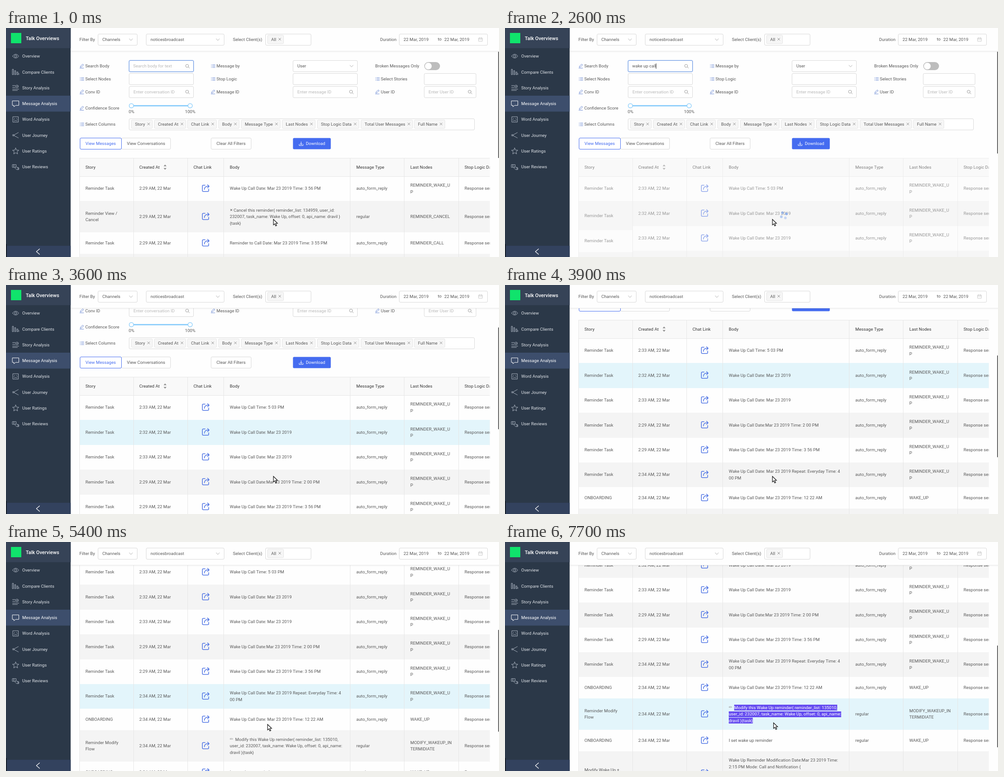
Recreate the animation shown at these times as an HTML page with a canvas. Size 1095 by 511 pixels, loop 8 s.

```html
<!DOCTYPE html>
<html lang="en">
<head>
<meta charset="utf-8">
<title>Message analysis</title>
<style>
html, body { margin: 0; width: 100%; height: 100%; overflow: hidden; background: #fefefe; }
canvas { display: block; width: 1095px; height: 511px; }
</style>
</head>
<body>
<canvas id="stage"></canvas>
<script>
const W = 1095, H = 511, LOOP = 8000;
const canvas = document.getElementById('stage');
const dpr = window.devicePixelRatio || 1;
canvas.width = W * dpr;
canvas.height = H * dpr;
const ctx = canvas.getContext('2d');

const FONT = 'Roboto, "Open Sans", sans-serif';
const SIZE = 9.66, LEAD = 14.4;
const INK = '#595959', DARK = '#383838', HINT = '#b8b8b8';
const LINE = '#d9d9d9', GRID = '#e6e6e6', BLUE = '#456cf0', PAPER = '#fefefe';

// ---- helpers ----
const clamp = (v, a = 0, b = 1) => Math.min(b, Math.max(a, v));
const ramp = (t, a, b) => clamp((t - a) / (b - a));

// Piecewise linear track of [time, value, value...] keys.
function track(keys, t, i = 1) {
  let prev = keys[0];
  for (const key of keys) {
    if (t < key[0]) {
      const u = ramp(t, prev[0], key[0]);
      return prev[i] + (key[i] - prev[i]) * u;
    }
    prev = key;
  }
  return prev[i];
}

function setFont(size = SIZE, weight = 400) { ctx.font = `${weight} ${size}px ${FONT}`; }

// Text centred on y, with the baseline on a whole pixel.
function text(str, x, y, color = INK, size = SIZE, weight = 400) {
  setFont(size, weight);
  ctx.fillStyle = color;
  ctx.fillText(str, x, Math.round(y + size * 0.355));
}

function widthOf(str) { setFont(); return ctx.measureText(str).width; }

function rect(x, y, w, h, color) { ctx.fillStyle = color; ctx.fillRect(x, y, w, h); }

function box(x, y, w, h, fill, stroke, r = 2.5) {
  ctx.beginPath();
  ctx.roundRect(x, y, w, h, r);
  if (fill) { ctx.fillStyle = fill; ctx.fill(); }
  if (stroke) { ctx.strokeStyle = stroke; ctx.lineWidth = 1; ctx.stroke(); }
}

function stroke(d, x, y, color, width = 1) {
  ctx.save();
  ctx.translate(x, y);
  ctx.strokeStyle = color;
  ctx.lineWidth = width;
  ctx.lineJoin = ctx.lineCap = 'round';
  ctx.stroke(new Path2D(d));
  ctx.restore();
}

function circle(x, y, r, fill, edge, width = 1) {
  ctx.beginPath();
  ctx.arc(x, y, r, 0, Math.PI * 2);
  if (fill) { ctx.fillStyle = fill; ctx.fill(); }
  if (edge) { ctx.strokeStyle = edge; ctx.lineWidth = width; ctx.stroke(); }
}

const chevron = (x, y) => stroke('M-3.5-2L0 2L3.5-2', x, y, '#b0b0b0');
const cross = (x, y) => stroke('M-2.4-2.4L2.4 2.4M2.4-2.4L-2.4 2.4', x, y, '#8c8c8c');
const lens = (x, y) => stroke('M2 2L4.5 4.5M2.6-.5A3.3 3.3 0 1 1-4-.5A3.3 3.3 0 1 1 2.6-.5', x, y, '#9a9a9a');

function tag(label, x, y) {
  const w = widthOf(label) + 24.5;
  box(x + .5, y - 9.5, w, 19, '#f6f6f6', '#e4e4e4', 2);
  text(label, x + 8.5, y);
  cross(x + w - 8, y - .5);
}

// ---- sidebar ----
const MENU = [
  ['Overview', 'M-7 0Q0-9 7 0Q0 9-7 0M2.5 0A2.5 2.5 0 1 1-2.5 0A2.5 2.5 0 1 1 2.5 0'],
  ['Compare Clients', 'M-7-6H-5V6H-7ZM-2-3H0V6H-2ZM3 0H5V6H3ZM7 3V6'],
  ['Story Analysis', 'M-7-5H-1M-7-1H-1M-7 3H7M-7 6H4M6-3A3 3 0 1 1 0-3A3 3 0 1 1 6-3M1.8-3L3-2L4.7-4.2'],
  ['Message Analysis', 'M-7-6H7V4H0L-4 7V4H-7Z'],
  ['Word Analysis', 'M-6-6H6V6H-6ZM-3 4Q0 0 3 4M-3-2H-2M2-2H3M-4 1H-3M3 1H4'],
  ['User Journey', 'M6-6L-5 0L6 6M-3.5 0A1.7 1.7 0 1 1-7 0A1.7 1.7 0 1 1-3.5 0'],
  ['User Ratings', 'M0-7L2-2.2L7-1.8L3.2 1.5L4.4 6.5L0 3.8L-4.4 6.5L-3.2 1.5L-7-1.8L-2-2.2Z'],
  ['User Reviews', 'M-7-5H-4V1H-7ZM-4 0L-1 3V0H1V-5H-4M2 1H5V6H2L0 4M5 2H7V6H5']
];

function drawSidebar() {
  const w = 143.6;
  rect(0, 0, w, H, '#2b3848');
  rect(0, 0, w, 45, '#364357');
  rect(0, 151, w, 35.5, '#3d4e6c');
  rect(0, 486, w, 25, '#33425e');
  rect(0, 482, 2, 29, '#1a222d');
  box(11, 11, 23, 23, '#10e36c', null, 0);
  text('Talk Overviews', 44, 23, '#fff', 11.04, 500);
  MENU.forEach(([label, icon], i) => {
    const y = 62.8 + 35.3 * i, on = i === 3;
    stroke(icon, 21.5, y, on ? '#fff' : '#a9b2bf');
    text(label, 36, y, on ? '#fff' : '#dfe3e8');
  });
  stroke('M3.5-6L-3.5 0L3.5 6', 71, 499, '#fff', 1.2);
}

// ---- top bar ----
function drawTopBar() {
  rect(143, 0, W - 143, 52, PAPER);
  const g = ctx.createLinearGradient(0, 51, 0, 55);
  g.addColorStop(0, 'rgba(0,0,0,.07)');
  g.addColorStop(1, 'rgba(0,0,0,0)');
  rect(143, 51, W - 143, 4, g);
  text('Filter By', 163, 25.5);
  box(204.5, 13.5, 87, 25, '#fff', LINE);
  text('Channels', 214, 25.5);
  chevron(277.5, 26);
  box(311.5, 13.5, 173, 25, '#fff', LINE);
  text('noticesbroadcast', 321, 25.5);
  chevron(470.5, 26);
  text('Select Client(s)', 504, 25.5);
  box(576.5, 13.5, 101, 25, '#fff', LINE);
  tag('All', 580.5, 25.5);
  text('Duration', 831, 25.5);
  box(873.5, 13.5, 196, 25, '#fff', LINE);
  text('22 Mar, 2019', 883, 25.5);
  text('to', 959, 24.5);
  text('22 Mar, 2019', 973.5, 25.5);
  stroke('M-4-3H4V4H-4ZM-4-.5H4M-2-4.5V-2M2-4.5V-2', 1054, 25.5, '#c4c4c4', .9);
}

// ---- filters ----
const EDIT = 'M-4.5 4.5H4M-3.5 2.2L-3 0L2-4.5L4-2.6L-1 1.8Z';
const LIST = 'M-1.5-3H4.5M-1.5 0H4.5M-1.5 3H4.5M-4-3H-3.4M-4 0H-3.4M-4 3H-3.4';
const FIELDS = [
  ['Search Body', EDIT, 0, 0, ''], ['Message by', LIST, 1, 0, ''],
  ['Select Nodes', LIST, 0, 1, ''], ['Stop Logic', LIST, 1, 1, ''], ['Select Stories', LIST, 2, 1, ''],
  ['Conv ID', EDIT, 0, 2, 'Enter conversation ID'], ['Message ID', EDIT, 1, 2, 'Enter message ID'],
  ['User ID', EDIT, 2, 2, 'Enter User ID']
];
const COLS = [[168.5, 273.5, 143], [460, 637.5, 143], [825, 929, 115]];
const TAGS = [['Story', 278], ['Created At', 329], ['Chat Link', 402.5], ['Body', 471.5],
  ['Message Type', 522], ['Last Nodes', 613], ['Stop Logic Data', 691],
  ['Total User Messages', 788], ['Full Name', 906.5]];
const TYPED = 'wake up call';
const KEYS = [[700, 1], [900, 2], [1000, 3], [1200, 5], [1400, 6], [1700, 7], [1900, 10], [2100, 11], [2200, 12]];

function label(name, icon, x, y) {
  stroke(icon, x, y, '#5f7fd0', .9);
  text(name, x + 7.5, y);
}

function drawFilters(t) {
  for (const [name, icon, col, row, hint] of FIELDS) {
    const [lx, bx, bw] = COLS[col], y = 85 + 28.8 * row, focus = !col && !row;
    label(name, icon, lx, y);
    const top = Math.round(y) - 12.5;
    if (focus) box(bx - 1.5, top - 1.5, bw + 3, 28, '#dce8fa', null, 4);
    box(bx, top, bw, 25, '#fff', focus ? '#5f8fe0' : LINE);
    if (hint) text(hint, bx + 9.5, y, HINT);
    if (focus || hint) lens(bx + bw - 13.5, y);
  }
  text('User', 647, 85);
  chevron(767.5, 85);

  const count = KEYS.reduce((n, [at, len]) => t >= at ? len : n, 0);
  const word = TYPED.slice(0, count);
  text(word || 'Search body for text', 282.5, 85, word ? INK : HINT);
  const caret = (t >= 400 && t < 2750) || t >= 3300;
  if (caret) rect(Math.round(282.3 + widthOf(word)), 79, 1, 12, '#333');

  text('Broken Messages Only', 820, 85);
  box(929, 76, 35, 18, '#bdbdbd', null, 9);
  circle(938, 85, 7.6, '#fff');

  label('Confidence Score', EDIT, 168.5, 179);
  rect(278, 172, 131, 3, '#91d0fb');
  for (const x of [278.5, 409]) circle(x, 173.5, 4.8, '#fff', '#91d0fb', 1.5);
  text('0%', 272.5, 187);
  text('100%', 397.5, 187);

  label('Select Columns', LIST, 168.5, 215);
  box(273.5, 202.5, 767, 25, '#fff', LINE);
  for (const [name, x] of TAGS) tag(name, x, 214.7);

  box(256.5, 245.5, 109, 25, '#fff', LINE);
  box(164.5, 245.5, 92, 25, '#fff', BLUE);
  text('View Messages', 176.5, 258, BLUE);
  text('View Conversations', 268.5, 258);
  box(455.5, 245.5, 89, 25, '#fff', LINE);
  text('Clear All Filters', 467.5, 258);
  box(637.4, 245.4, 84, 25.2, BLUE, null);
  stroke('M0-4V2M-2.3 0L0 2.3L2.3 0M-4.3 1.5V4.3H4.3V1.5', 655.5, 258, '#fff');
  text('Download', 666, 258, '#fff');
}

// ---- table ----
const TOP = 331, ROW = 55.4;
const EDGES = [163, 283, 403, 483, 764, 884, 1005];
const TEXT_X = [176.5, 296, 416.5, 497, 778, 898, 1018.5];
const HEADS = ['Story', 'Created At', 'Chat Link', 'Body', 'Message Type', 'Last Nodes', 'Stop Logic Data'];
const FORM = 'auto_form_reply', NODE = 'REMINDER_WAKE_U|P', TASK = 'Reminder Task', DAY = ' AM, 22 Mar';
const row = (story, time, body, type, node, h = ROW, mark = '', indent = 0) =>
  ({ story, time: time + DAY, body, type, node, h, mark, indent });
const wake = (time, rest) => row(TASK, time, 'Wake Up Call ' + rest, FORM, NODE);

const BEFORE = [
  wake('2:29', 'Date: Mar 23 2019 Time: 3 56 PM'),
  row('Reminder View /|Cancel', '2:29',
    'Cancel this reminder{ reminder_list: 134959, user_id:|232007, task_name: Wake Up, offset: 0, api_name: dravil }|{task}',
    'regular', 'REMINDER_CANCEL', 70, '✕', 8.5),
  row(TASK, '2:29', 'Reminder to Call Date: Mar 23 2019 Time: 3 55 PM', FORM, 'REMINDER_CALL', 48),
  row('', '', '', '', '', 70)
];
const AFTER = [
  wake('2:33', 'Time: 5 03 PM'),
  wake('2:32', 'Date: Mar 23 2019'),
  wake('2:33', 'Date: Mar 23 2019'),
  wake('2:29', 'Date:Mar 23 2019 Time: 2 00 PM'),
  wake('2:29', 'Date: Mar 23 2019 Time: 3 56 PM'),
  wake('2:34', 'Date: Mar 23 2019 Repeat: Everyday Time: 4|00 PM'),
  row('ONBOARDING', '2:34', 'Wake Up Call Date: Mar 23 2019 Time: 12 22 AM', FORM, 'WAKE_UP', 48),
  row('Reminder Modify|Flow', '2:34',
    'Modify this Wake Up reminder{ reminder_list: 135010,|user_id: 232007, task_name: Wake Up, offset: 0, api_name:|dravil }{task}',
    'regular', 'MODIFY_WAKEUP_IN|TERMIDIATE', 70, '✏', 12),
  row('ONBOARDING', '2:34', 'I set wake up reminder', 'regular', 'WAKE_UP', 48),
  row('Modify Wake Up +|Reminder', '2:34',
    'Wake Up Reminder Modification Date:Mar 23 2019 Time:|2:15 PM Mode: Call and Notification {|reminder_list: 135010, user_id: 232007,|task_name: Wake Up, offset: 0, api_name:|dravil }{task}',
    'regular', 'MODIFY_WAKEUP', 98)
];
const STALE = [ROW, 65, 48.5, 70];   // heights of the pinned column before it catches up
const HOVERS = [[2950, 1], [4350, 6], [4600, 5], [5500, 7]];
const FADE = 200;

function hoverLevel(t, index) {
  let level = 0;
  HOVERS.forEach(([at, i], n) => {
    if (i !== index || t < at) return;
    const end = HOVERS[n + 1] ? HOVERS[n + 1][0] : Infinity;
    level = t < end ? ramp(t, at, at + FADE) : 1 - ramp(t, end, end + FADE);
  });
  return level;
}

function lines(str, x, mid, color = INK, mark = '', indent = 0) {
  const parts = str.split('|'), first = mid - (parts.length - 1) * LEAD / 2;
  if (mark) {
    const pencil = mark === '✏';
    ctx.font = `${pencil ? 9.5 : 8}px "DejaVu Sans", sans-serif`;
    ctx.fillStyle = pencil ? '#999' : '#444';
    ctx.fillText(mark, x, Math.round(first + 3));
  }
  parts.forEach((p, i) => text(p, x + (i ? 0 : indent), first + i * LEAD, color));
}

const linkIcon = (x, y) =>
  stroke('M-1.5-6.5H-5.5Q-7.5-6.5-7.5-4.5V5.5Q-7.5 7.5-5.5 7.5H4.5Q6.5 7.5 6.5 5.5V2M-3 3Q-2.5-4 4-4H7.5M4-7.5L7.5-4L4-.5', x, y, '#4c72e4', 1.5);

function cellBack(x, w, y, h, index, t) {
  rect(x, y, w, h, index % 2 ? '#f4f4f4' : PAPER);
  ctx.globalAlpha = hoverLevel(t, index);
  rect(x, y, w, h, '#e3f5fb');
  ctx.globalAlpha = 1;
  rect(x, y + h, w, 1, GRID);
}

function drawRows(t) {
  const rows = t < 2550 ? BEFORE : AFTER, stale = t >= 2550 && t < 2800;
  let y = TOP, pinned = TOP;
  rows.forEach((r, i) => {
    const top = Math.round(y), h = Math.round(y + r.h) - top, mid = y + r.h / 2 - .7;
    const ph = stale && STALE[i] ? STALE[i] : r.h;
    const pTop = Math.round(pinned);
    cellBack(283, 792, top, h, i, t);
    if (!stale || i < STALE.length) {
      cellBack(163, 120, pTop, Math.round(pinned + ph) - pTop, i, t);
      lines(r.story, TEXT_X[0], pinned + ph / 2 - .7);
    }
    if (r.type) {
      text(r.time, TEXT_X[1], mid);
      linkIcon(443.7, mid - .7);
      lines(r.body, TEXT_X[3], mid, INK, r.mark, r.indent);
      if (r.mark === '✏') drawSelection(r, mid, t);
      text(r.type, TEXT_X[4], mid);
      lines(r.node, TEXT_X[5], mid);
      text('Response sent', TEXT_X[6], mid);
    }
    y += r.h;
    pinned += ph;
  });
  return y;
}

function drawSelection(r, mid, t) {
  if (t < 6850) return;
  const [px, py] = pointer(t), parts = r.body.split('|');
  const first = mid - LEAD, shift = scrollAt(t);
  const current = clamp(Math.floor((py + shift - first + LEAD / 2) / LEAD), 0, 2);
  parts.forEach((p, i) => {
    if (i > current) return;
    const x = TEXT_X[3] + (i ? 0 : r.indent), y = first + i * LEAD;
    const full = widthOf(p), w = i < current ? full : clamp(px - x, 0, full);
    ctx.save();
    ctx.beginPath();
    ctx.rect(x, Math.round(y - 6), w, 13);
    ctx.clip();
    rect(x, y - 8, w, 16, '#654cf0');
    text(p, x, y, '#fff');
    ctx.restore();
  });
}

function drawTable(t) {
  ctx.save();
  ctx.beginPath();
  ctx.rect(163, 290, 911.5, 900);
  ctx.clip();
  const bottom = drawRows(t);
  rect(163, 290, 912, 41, '#f9f9f9');
  rect(163, 290, 912, 1, GRID);
  rect(163, 331, 912, 1, GRID);
  HEADS.forEach((h, i) => text(h, TEXT_X[i], 310.3, DARK));
  ctx.fillStyle = '#8c8c8c';
  ctx.fill(new Path2D('M350 308.5L353.3 304.8L356.6 308.5ZM350 312.5L353.3 316.2L356.6 312.5Z'));
  for (const x of EDGES) rect(x, 290, 1, bottom - 290, GRID);

  const dim = ramp(t, 2350, 2550) - ramp(t, 2800, 3100);
  if (dim > 0) rect(163, 290, 912, 300, `rgba(247,247,247,${dim * .4})`);
  ctx.restore();
  if (t >= 2400 && t < 2800) drawSpinner(t);
}

function drawSpinner(t) {
  for (let i = 0; i < 4; i++) {
    const a = t / 1200 * Math.PI * 2 + i * Math.PI / 2;
    ctx.globalAlpha = .35 + .12 * i;
    circle(619.5 + 6.6 * Math.cos(a), 418 + 6.6 * Math.sin(a), 2.9, '#6f9bea');
  }
  ctx.globalAlpha = 1;
}

// ---- motion ----
const SCROLL = [[3430, 0], [3500, 35], [3600, 85], [3700, 134], [3800, 178], [3900, 212], [4050, 233], [4300, 240],
  [5130, 240], [5250, 264], [5400, 291], [5600, 301], [5730, 301], [5850, 330], [5980, 354], [6100, 362]];
const POINTER = [[4350, 594, 427], [4800, 581, 407], [5750, 581, 407], [6000, 563, 406],
  [6150, 563, 406], [6600, 508, 370], [6800, 508, 370], [6950, 560, 373], [7150, 630, 388], [7400, 599, 411]];
const ARROW = new Path2D('M0 0V12.5L2.9 9.9L5 14.6L7.2 13.6L5.1 9H9.1Z');

const scrollAt = t => Math.round(track(SCROLL, t));
const pointer = t => [track(POINTER, t, 1), track(POINTER, t, 2)];

function drawPointer(t) {
  let [x, y] = pointer(t);
  if (t >= 5900 && t < 7600) {
    const beam = 'M-3-6.5Q0-6.5 0-5V5Q0 6.5-3 6.5M3-6.5Q0-6.5 0-5M0 5Q0 6.5 3 6.5';
    stroke(beam, x, y, '#fff', 3);
    stroke(beam, x, y, '#111', 1.2);
    return;
  }
  if (t >= 7600) { x = 596.5; y = 403.5; }
  ctx.save();
  ctx.translate(x, y);
  ctx.fillStyle = '#fff';
  ctx.fill(ARROW);
  ctx.strokeStyle = '#111';
  ctx.lineWidth = 1.2;
  ctx.stroke(ARROW);
  ctx.restore();
}

function draw(t) {
  ctx.setTransform(dpr, 0, 0, dpr, 0, 0);
  rect(0, 0, W, H, PAPER);
  const scroll = scrollAt(t);
  ctx.save();
  ctx.translate(0, -scroll);
  drawFilters(t);
  drawTable(t);
  ctx.restore();
  drawTopBar();
  drawSidebar();
  rect(1093, 53 + scroll * .492, 2, t < 2550 ? 237 : 227, '#6c6c6c');
  drawPointer(t);
}

const start = performance.now();
function tick() {
  draw((performance.now() - start) % LOOP);
  requestAnimationFrame(tick);
}
tick();
</script>
</body>
</html>
```
